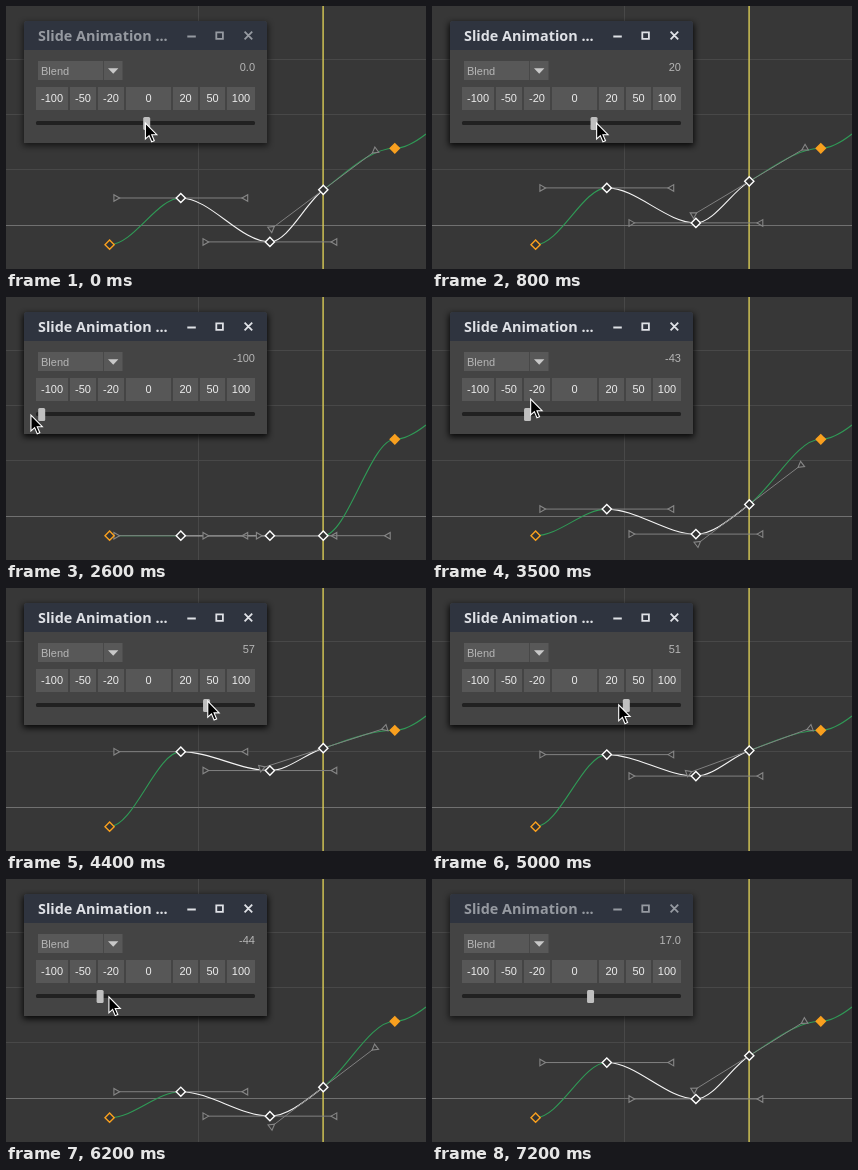
An HTML page for the animation above (7.5 s loop, 420x263 px).

```html
<!DOCTYPE html>
<html lang="en">
<head>
<meta charset="utf-8">
<title>Slide Animation</title>
<style>
  html, body { margin: 0; width: 100%; height: 100%; overflow: hidden; background: #373737; }
  svg { display: block; width: 100%; height: 100%; }
  text { font: 11px "Liberation Sans", Arial, sans-serif; fill: #b6b6b6; }
  .grid { stroke: #484848; fill: none; }
  .axis { stroke: #707070; }
  .curve { fill: none; stroke: #2f9a56; stroke-width: 1.1; }
  .picked { stroke: #f4f4f4; }
  .arm { stroke: #808080; }
  .tip { fill: #373737; stroke: #868686; stroke-width: 1.1; }
  .key { fill: #333; stroke: #fff; stroke-width: 1.4; }
  .loose { stroke: #f9a01f; }
  .solid { fill: #f9a01f; stroke: #f9a01f; }
  .title { font: 700 14.4px "Noto Sans", "Open Sans", sans-serif; }
  #bar { --ink: #969aa1; }
  #bar.active { --ink: #dfe1e6; }
  #bar text { fill: var(--ink); }
  #bar path { stroke: var(--ink); stroke-width: 1.8; fill: none; }
  .button { fill: #575757; }
  .label { fill: #ececec; text-anchor: middle; }
</style>
</head>
<body>
<svg id="stage" viewBox="0 0 420 263" xmlns="http://www.w3.org/2000/svg">
  <defs>
    <filter id="soft" x="-10%" y="-20%" width="120%" height="140%"><feGaussianBlur stdDeviation="3.2"/></filter>
  </defs>
  <rect width="420" height="263" fill="#373737"/>
  <path class="grid" d="M0 53.5H420M0 108.5H420M0 163.5H420M192.5 0V263"/>
  <path class="axis" d="M0 219.5H420"/>
  <path d="M317.1 0V263" stroke="#d9cb55" stroke-width="1.4"/>
  <g id="graph"></g>
  <rect id="shadow" x="17" y="17" width="245" height="123" filter="url(#soft)"/>
  <path d="M18 137V18q0-3 3-3H258q3 0 3 3V137Z" fill="#444"/>
  <path d="M18 44V18q0-3 3-3H258q3 0 3 3V44Z" fill="#2f343f"/>
  <g id="bar">
    <text class="title" x="32" y="35">Slide Animation ...</text>
    <path d="M181.3 30.5h8.5M210.3 26.3h6.6v6.6h-6.6ZM238.6 25.7l7.6 7.6M246.2 25.7l-7.6 7.6"/>
  </g>
  <rect x="32" y="55" width="84.5" height="19" fill="#585858"/>
  <path d="M97.5 55V74" stroke="#484848"/>
  <path d="M102 62.3h10.4l-5.2 5.4Z" fill="#c8c8c8"/>
  <text x="35" y="69">Blend</text>
  <text id="value" x="249" y="65" text-anchor="end"></text>
  <g id="buttons"></g>
  <rect x="30" y="115" width="219" height="4" rx="1.5" fill="#212121"/>
  <rect id="knob" y="111" width="7" height="13" rx="1.5" fill="#bfbfbf"/>
  <path id="cursor" d="M0 0V16L3.7 12.6 6.3 18.8 8.9 17.7 6.3 11.7H11.4Z"
        fill="#000" stroke="#fff" stroke-width="1.1"/>
</svg>
<script>
const $ = id => document.getElementById(id);
const LOOP = 7500, STEP = 100, PRESS = 500, RELEASE = 6700;
const LEAD = 30;                    // the slider trails the pointer by this much
const ARM = 65, LOW = 238.7, HIGH = 142.3;
const FIRST = [103.6, LOW], LAST = [388.8, HIGH];

// turning points of the drag: ms, reach in slider units, pointer height
const drag = [
  [PRESS, 0, 117], [1500, 107, 117], [1750, 114, 117], [2400, -25, 117],
  [2600, -102, 118], [2950, -160, 118], [3100, -120, 115], [3500, -43, 102],
  [4400, 57, 113], [4750, 78, 115], [5500, -66, 119], [5850, -130, 119],
  [6400, 2, 117], [RELEASE, 17, 115], [7000, -50, -60]
];

// smooth path through the points without overshoot
function along(t, col) {
  const n = drag.length - 1;
  t = Math.max(drag[0][0], Math.min(drag[n][0], t));
  const i = Math.min(n - 1, drag.findLastIndex(p => p[0] <= t));
  const rate = j => j < 0 || j >= n ? 0 :
    (drag[j + 1][col] - drag[j][col]) / (drag[j + 1][0] - drag[j][0]);
  const slope = j => {
    const a = rate(j - 1), b = rate(j);
    return a * b > 0 ? 2 * a * b / (a + b) : 0;
  };
  const [p, q] = [drag[i], drag[i + 1]], span = q[0] - p[0];
  const u = (t - p[0]) / span, w = 1 - u;
  return p[col] * w * w * (1 + 2 * u) + q[col] * u * u * (3 - 2 * u) +
    span * u * w * (w * slope(i) - u * slope(i + 1));
}

function add(parent, tag, attrs, text = "") {
  const el = document.createElementNS("http://www.w3.org/2000/svg", tag);
  for (const k in attrs) el.setAttribute(k, attrs[k]);
  el.textContent = text;
  parent.append(el);
  return el;
}

let left = 30;
for (const [n, width] of [[-100, 32], [-50, 26], [-20, 26], [0, 45], [20, 25], [50, 25], [100, 28]]) {
  add($("buttons"), "rect", { class: "button", x: left, y: 81, width, height: 23 });
  add($("buttons"), "text", { class: "label", x: left + width / 2, y: 96 }, n);
  left += width + 2;
}

const graph = $("graph");
const curves = [0, 1, 2, 3].map(i =>
  add(graph, "path", { class: i == 1 || i == 2 ? "curve picked" : "curve" }));
add(graph, "path", { class: "curve", d: "M388.8 142.3C399 142.3 409 136.5 420 128" });

const keys = [[174.8, 192], [263.9, 235.9], [317.3, 183.8]].map(([x, y]) => ({
  x, y,
  arm: add(graph, "path", { class: "arm" }),
  tips: [-1, 1].map(() => add(graph, "path", { class: "tip", d: "M3.8 0L-1.9 3.3V-3.3Z" }))
}));
const diamond = cls => add(graph, "path", { class: "key " + cls, d: "M0-4.6L4.6 0 0 4.6-4.6 0Z" });
const place = (el, x, y, turn = 0) =>
  el.setAttribute("transform", `translate(${x} ${y}) rotate(${turn})`);
place(diamond("loose"), ...FIRST);
place(diamond("solid"), ...LAST);
keys.forEach(k => k.mark = diamond(""));

function drawGraph(v) {
  const goal = v > 0 ? HIGH : LOW, mix = Math.abs(v) / 100;
  const pts = [FIRST, ...keys.map(k => [k.x, k.y + (goal - k.y) * mix]), LAST];
  const [, , low, mid, end] = pts;
  // the third key follows its neighbours and goes flat when level with one
  const tilt = Math.abs(mid[1] - low[1]) < 0.01 ? 0 : (end[1] - low[1]) / (end[0] - low[0]);
  const slopes = [0, 0, 0, tilt, 0];

  curves.forEach((c, i) => {
    const [ax, ay] = pts[i], [bx, by] = pts[i + 1], d = (bx - ax) / 3;
    c.setAttribute("d", `M${ax} ${ay}C${ax + d} ${ay + d * slopes[i]} ` +
      `${bx - d} ${by - d * slopes[i + 1]} ${bx} ${by}`);
  });
  keys.forEach((k, i) => {
    const [x, y] = pts[i + 1], a = Math.atan(slopes[i + 1]), deg = a * 180 / Math.PI;
    const dx = ARM * Math.cos(a), dy = ARM * Math.sin(a);
    k.arm.setAttribute("d", `M${x - dx} ${y - dy}L${x + dx} ${y + dy}`);
    place(k.tips[0], x - dx, y - dy, deg);
    place(k.tips[1], x + dx, y + dy, deg + 180);
    place(k.mark, x, y);
  });
}

function draw(ms) {
  const t = Math.floor(ms / STEP) * STEP;
  const active = t >= PRESS && t < 7200, dragging = t >= PRESS && t <= RELEASE;
  const v = Math.max(-100, Math.min(100, along(Math.min(t, RELEASE), 1)));
  const ahead = t < PRESS ? t : t + LEAD;

  drawGraph(v);
  $("value").textContent = dragging ? Math.round(v) : v.toFixed(1);
  $("knob").setAttribute("x", 137.2 + 1.05 * v);
  place($("cursor"), 139.4 + 1.05 * along(ahead, 1), along(ahead, 2));
  $("cursor").style.display = t < 7000 ? "" : "none";
  $("bar").classList.toggle("active", active);
  $("shadow").setAttribute("opacity", active ? 0.85 : 0.6);
}

const start = performance.now();
function tick() {
  draw((performance.now() - start) % LOOP);
  requestAnimationFrame(tick);
}
tick();
</script>
</body>
</html>
```
